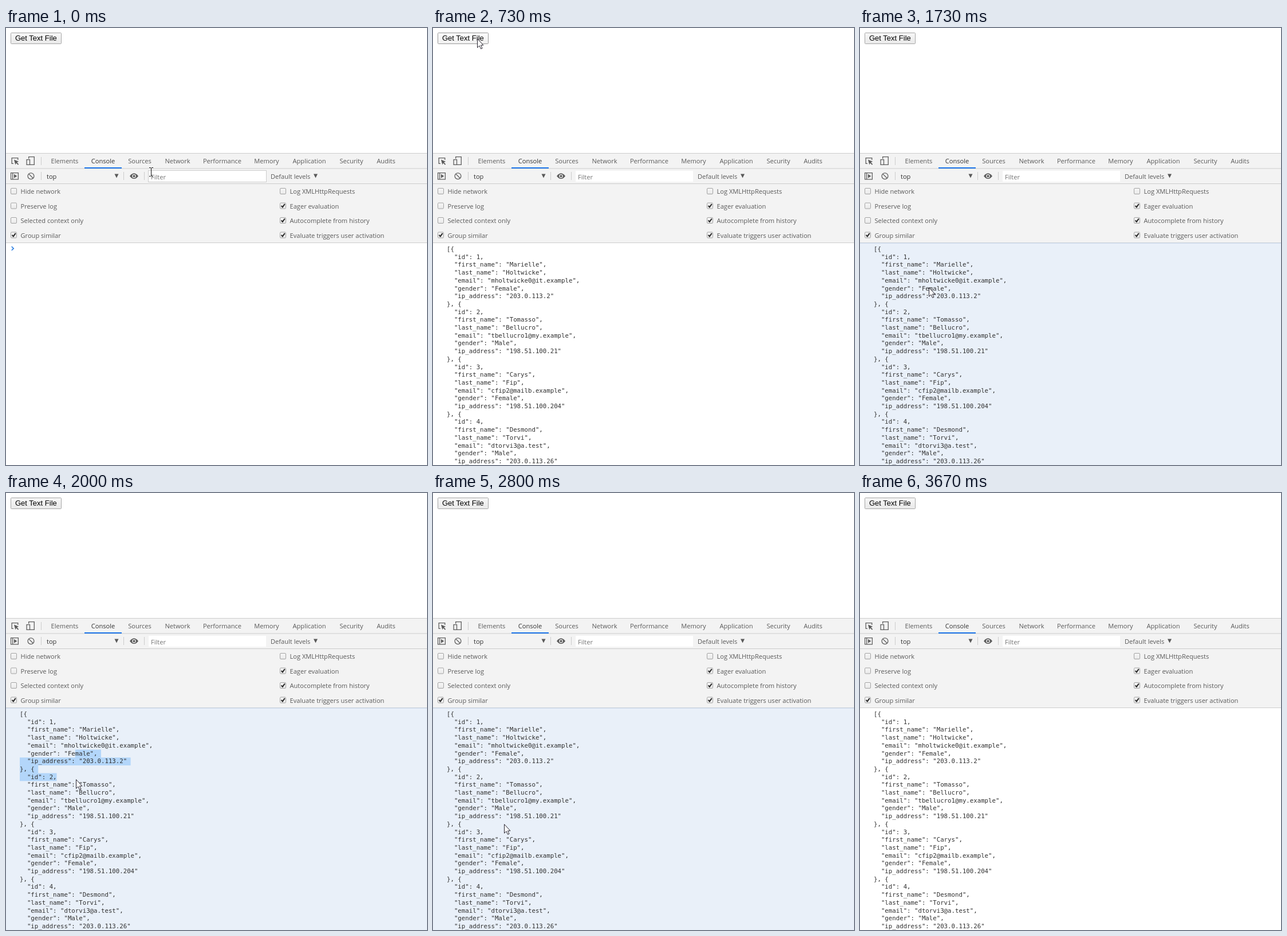
These frames come from a looping animation (735x762 px, 3.74 s). An HTML page:

```html
<!DOCTYPE html>
<html lang="en">
<head>
<meta charset="utf-8">
<title>Get Text File</title>
<style>
  html, body { margin: 0; width: 100%; height: 100%; overflow: hidden; background: #fff; }
  svg, pre { position: absolute; left: 0; top: 0; margin: 0; }
  text { font: 11.1px "Open Sans", "Noto Sans", sans-serif; fill: #5a5a5a; }
  .tab { text-anchor: middle; }
  .on { fill: #333; }
  .icon { fill: none; stroke: #5f5f5f; stroke-width: 1.3; }
  .solid { fill: #5a5a5a; }
  .line { fill: none; stroke: #ccc; }
  #label { font: 13.02px "Liberation Sans", Arial, sans-serif; fill: #000; }
  #button { fill: url(#face); stroke: #a6a6a6; }
  #button.hover { fill: url(#faceHover); stroke: #999; }
  #log {
    left: 24px; top: 379px; color: #303030;
    font: 10.72px/13.7px "DejaVu Sans Mono", monospace;
  }
</style>
</head>
<body>
<svg width="735" height="762" viewBox="0 0 735 762">
  <defs>
    <linearGradient id="face" x2="0" y2="1"><stop stop-color="#f7f7f7"/><stop offset="1" stop-color="#e9e9e9"/></linearGradient>
    <linearGradient id="faceHover" x2="0" y2="1"><stop stop-color="#fbfbfb"/><stop offset="1" stop-color="#f0f0f0"/></linearGradient>
  </defs>

  <rect id="button" x="8.5" y="8.5" width="88" height="19" rx="1"/>
  <text id="label" x="16" y="22">Get Text File</text>

  <rect y="218" width="735" height="157" fill="#f3f3f3"/>
  <path class="line" d="M0 218.5H735M0 245H735M0 271.5H735M0 374.5H735"/>
  <path class="line" d="M61.5 225V239M61.5 251V265M205.5 251V265M241.5 251V265"/>
  <rect x="137" y="243" width="65" height="2" fill="#1a73e8"/>
  <g id="tabs"></g>

  <path class="icon" d="M13 236.4H10.2V226.6H20.8V230"/>
  <path class="solid" d="M14 229.5L22.3 233 19 234.3 22.2 237.6 21 238.8 17.8 235.6 16.4 238.5Z"/>
  <path class="icon" d="M39.7 228V224.6H49.3V238.4H42"/>
  <rect class="icon" x="36.1" y="229.6" width="5.4" height="8.8"/>

  <path class="icon" d="M8.6 252.6H21.4V263.9H8.6ZM11.7 252.6V263.9"/>
  <path class="solid" d="M14 254.8L19.3 258.2 14 261.7Z"/>
  <circle class="icon" cx="43.5" cy="258.2" r="5.4"/>
  <path class="icon" d="M39.7 254.4L47.3 262"/>
  <text x="71" y="262.5" class="on">top</text>
  <path class="solid" d="M189.5 254.5H196.5L193 261.5ZM537 254.5H544L540.5 261.5Z"/>
  <path class="solid" d="M216 258.2Q223.5 248.4 231 258.2Q223.5 268 216 258.2Z"/>
  <circle cx="223.5" cy="258.2" r="3.3" fill="#f3f3f3"/>
  <circle class="solid" cx="223.5" cy="258.2" r="2"/>
  <rect x="249" y="249" width="205" height="19" fill="#fff"/>
  <rect id="focus" class="line" x="248.5" y="248.5" width="206" height="20"/>
  <text x="253" y="263.5" style="fill:#757575">Filter</text>
  <text x="462" y="262.5">Default levels</text>
  <g id="options"></g>

  <path id="prompt" d="M9.8 381L13.2 384.4 9.8 387.8" fill="none" stroke="#2a7de1" stroke-width="1.6"/>
  <g id="active">
    <rect y="375" width="735" height="387" fill="#e9f0f9"/>
    <rect y="374.5" width="735" height="1" fill="#c3d4ea"/>
  </g>
  <path id="selection" fill="#b3d6fa"/>
</svg>

<pre id="log"></pre>

<svg width="735" height="762" viewBox="0 0 735 762">
  <path id="beam" d="M250 243.5H252.5L253.5 244.5 254.5 243.5H257M253.5 244.5V257.5M250 258.5H252.5L253.5 257.5 254.5 258.5H257" fill="none" stroke="#111"/>
  <path id="arrow" d="M.5 .7V16.2L4 12.9 6.6 18.4 9 17.3 6.5 12H11Z" fill="#fff" stroke="#23202b"/>
</svg>

<script>
const LOOP = 3740, LEFT = 24, TOP = 379, ROW = 13.7, CHAR = 6.453;
const $ = id => document.getElementById(id);

const tabs = { Elements: 102.5, Console: 169.5, Sources: 233.5, Network: 299.5, Performance: 377.5,
  Memory: 455, Application: 529.5, Security: 603, Audits: 663.5 };
$('tabs').innerHTML = Object.entries(tabs).map(([name, x]) =>
  `<text class="tab ${name === 'Console' ? 'on' : ''}" x="${x}" y="236">${name}</text>`).join('');

const option = (label, checked, x, row) => {
  const y = 279.5 + row * 25.5;
  return `<rect x="${x + .5}" y="${y}" width="10" height="10" rx="1.5" fill="url(#face)" stroke="#a3a3a3"/>` +
    (checked ? `<path d="M${x + 2.6} ${y + 4.8}l2.2 2.6 4-5.6" fill="none" stroke="#2a2a2a" stroke-width="2"/>` : '') +
    `<text x="${x + 17.5}" y="${y + 9.5}">${label}</text>`;
};
$('options').innerHTML =
  ['Hide network', 'Preserve log', 'Selected context only', 'Group similar']
    .map((label, i) => option(label, i === 3, 8, i)).join('') +
  ['Log XMLHttpRequests', 'Eager evaluation', 'Autocomplete from history', 'Evaluate triggers user activation']
    .map((label, i) => option(label, i > 0, 478, i)).join('');

const keys = ['first_name', 'last_name', 'email', 'gender', 'ip_address'];
const people = [
  ['Marielle', 'Holtwicke', 'mholtwicke0@it.example', 'Female', '203.0.113.2'],
  ['Tomasso', 'Bellucro', 'tbellucro1@my.example', 'Male', '198.51.100.21'],
  ['Carys', 'Fip', 'cfip2@mailb.example', 'Female', '198.51.100.204'],
  ['Desmond', 'Torvi', 'dtorvi3@a.test', 'Male', '203.0.113.26']
];
const lines = people.flatMap((person, i) => [
  i ? '}, {' : '[{',
  `  "id": ${i + 1},`,
  ...keys.map((key, k) => `  "${key}": "${person[k]}"${k < 4 ? ',' : ''}`)
]);
$('log').textContent = lines.join('\n');

// Pointer stops: time, x, y
const stops = [
  [70, 246, 277], [130, 243, 270], [200, 226, 236], [270, 188, 168], [330, 143, 98],
  [400, 106, 46], [470, 82, 22], [530, 79, 20], [600, 77, 18],
  [1070, 82, 62], [1130, 99, 205], [1200, 114, 368], [1270, 120, 452],
  [1800, 121, 457], [1860, 121, 467], [1930, 121, 481], [2000, 122, 499],
  [2060, 122, 518], [2130, 123, 538], [2200, 123, 559], [2270, 124, 577],
  [3070, 122, 585], [3130, 114, 611], [3200, 100, 653], [3270, 80, 702], [3330, 57, 748]
];

function selectionPath(x, y) {
  const end = Math.floor((y - TOP) / ROW);
  let d = '';
  for (let row = 5; row <= end; row++) {
    const from = row === 5 ? 15 : 0;
    const to = row < end ? lines[row].length + 1
      : Math.min(lines[row].length, Math.round((x - LEFT) / CHAR));
    if (to > from) d += `M${LEFT + from * CHAR} ${TOP + row * ROW}h${(to - from) * CHAR}v${ROW}h${(from - to) * CHAR}z`;
  }
  return d;
}

const show = (id, on) => { $(id).style.visibility = on ? 'visible' : 'hidden'; };

function draw(t) {
  const [, x, y] = stops.filter(s => s[0] <= t).pop() || [0, 0, 0];
  const within = (a, b) => t >= a && t < b;
  show('beam', t < 70);
  show('focus', t < 70);
  show('arrow', within(70, 3400));
  $('arrow').setAttribute('transform', `translate(${x} ${y})`);
  $('button').classList.toggle('hover', within(530, 1070));
  show('prompt', t < 730);
  show('log', t >= 730);
  show('active', within(1730, 3670));
  $('selection').setAttribute('d', within(1730, 2800) ? selectionPath(x, y) : '');
}

const start = performance.now();
function tick() {
  draw((performance.now() - start) % LOOP);
  requestAnimationFrame(tick);
}
tick();
</script>
</body>
</html>
```
